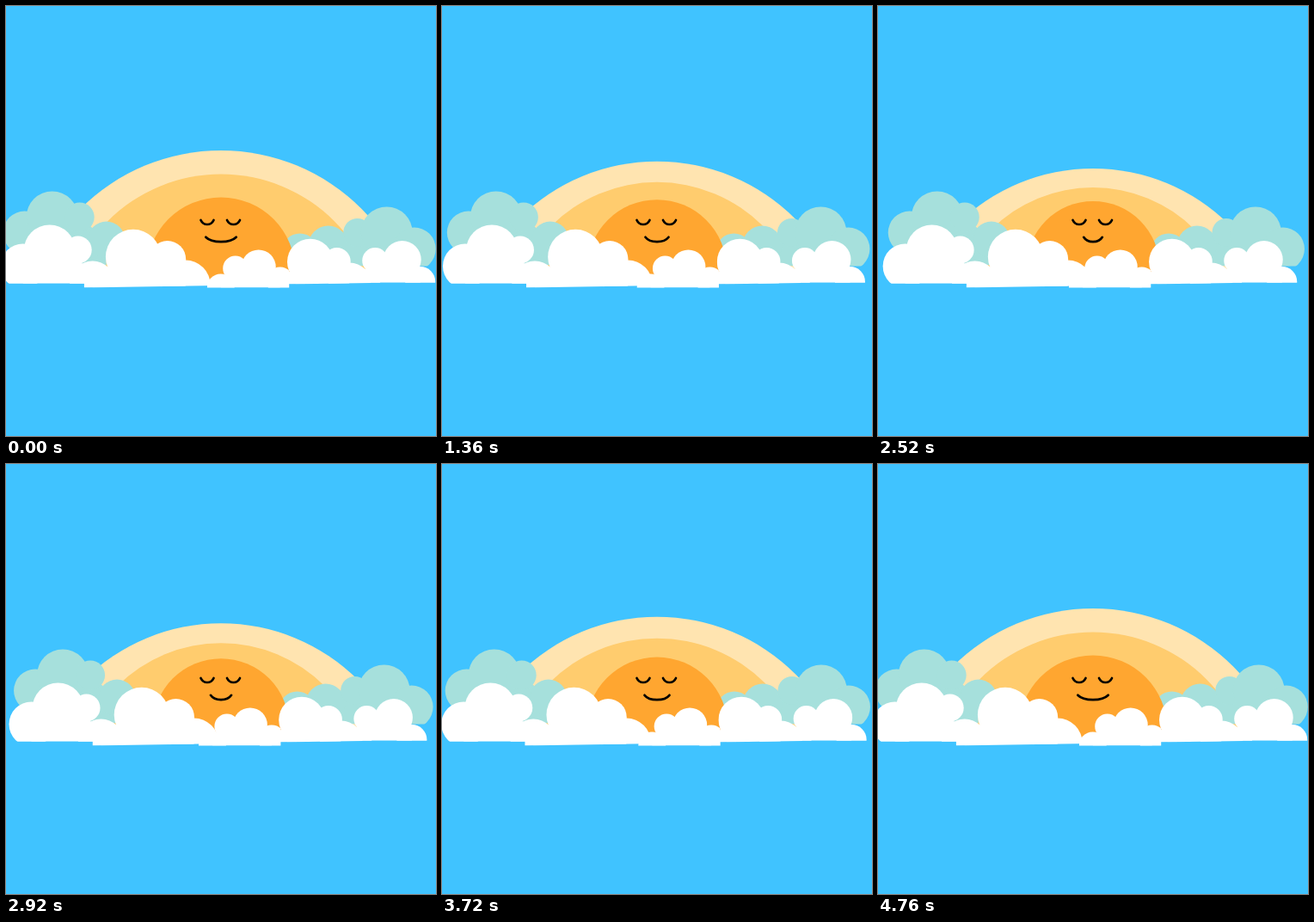
Animation of 500x500 px, one loop 4.84 s. Source, as an HTML page:

```html
<!DOCTYPE html>
<html lang="en">
<head>
<meta charset="utf-8">
<title>Sun behind clouds</title>
<style>
  html, body { margin: 0; width: 100%; height: 100%; overflow: hidden; background: #40c3ff; }
  svg { display: block; width: 100%; height: 100%; }
</style>
</head>
<body>
<svg viewBox="0 0 500 500">
  <defs>
    <clipPath id="rayClip"><rect width="500" height="310"/></clipPath>
    <clipPath id="sunClip"><rect width="500" height="320"/></clipPath>
  </defs>
  <rect width="500" height="500" fill="#40c3ff"/>
  <g clip-path="url(#rayClip)">
    <circle id="outer" fill="#ffe4b0"/>
    <circle id="middle" fill="#ffcc6e"/>
  </g>
  <g id="back" fill="#a6e0dc"/>
  <g clip-path="url(#sunClip)"><circle id="sun" fill="#ffa630"/></g>
  <g fill="none" stroke="#000" stroke-width="2.7" stroke-linecap="round">
    <path id="eyes"/>
    <path id="smile"/>
  </g>
  <g id="front" fill="#fff"/>
</svg>
<script>
const NS = "http://www.w3.org/2000/svg";
const LOOP = 4840, STEP = 40, END = 4760;
const $ = id => document.getElementById(id);

function add(parent, tag, attrs) {
  const el = document.createElementNS(NS, tag);
  for (const k in attrs) el.setAttribute(k, attrs[k]);
  return parent.appendChild(el);
}

// A cloud is a chain of puffs [cx, cy, r], filled below its centres
// and cut off at the sides and along a sloping floor.
function cloud(layer, drift, puffs, floor, left = -60, right = 560) {
  const [y0, y1 = y0] = floor;
  const id = "cut" + document.querySelectorAll("clipPath").length;
  const clip = add(document.querySelector("defs"), "clipPath", { id });
  add(clip, "polygon", { points: [left, 0, right, 0, right, y1, left, y0] });
  const el = add($(layer), "g", { "clip-path": `url(#${id})` });
  const centres = puffs.map(p => p.slice(0, 2));
  const base = Math.max(y0, y1);
  add(el, "polygon", { points: [[puffs[0][0], base], ...centres, [puffs.at(-1)[0], base]] });
  for (const [cx, cy, r] of puffs) add(el, "circle", { cx, cy, r });
  return { el, drift };
}

const clouds = [
  cloud("back", 16, [[21, 263, 25], [53, 245, 30], [85, 245, 17], [116, 271.5, 21.5]], [301]),
  cloud("back", -4, [[341, 285, 21], [374, 278, 23], [408, 263, 16.5], [442, 263, 30], [474, 282, 25]], [302]),
  cloud("front", 12.7, [[19, 302, 26], [50, 284, 30], [83, 283, 16], [93, 318, 20]], [322.3]),
  cloud("front", 12.7, [[100, 322, 26], [147.2, 291.2, 32], [187, 294, 21.5], [208, 324, 29]], [327, 324.2], 90, 260),
  cloud("front", -12.7, [[249, 327, 16], [266, 304.5, 14.5], [293, 303, 20], [318, 319, 16]], [327], 233, 328.5),
  cloud("front", -12.7, [[336, 318, 12], [353, 297, 26.7], [384, 296.5, 16], [399, 323, 25]], [323, 321.3], 326, 440),
  cloud("front", -12.7, [[424, 315, 12], [428.5, 295.5, 15], [460, 294.5, 22], [481, 320, 17.5]], [321.3])
];

// Places a disc by its top edge and radius.
function disc(id, top, r) {
  const el = $(id);
  el.setAttribute("cx", 250);
  el.setAttribute("cy", top + r);
  el.setAttribute("r", r);
}

// A hanging curve of half-width w and depth d.
const curve = (x, y, w, d) =>
  `M${x - w} ${y}C${x - w * .6} ${y + d * 4 / 3} ${x + w * .6} ${y + d * 4 / 3} ${x + w} ${y}`;

$("eyes").setAttribute("d", curve(234, 249, 7.5, 5) + curve(264.5, 249, 7.5, 5));

function draw(ms) {
  const t = Math.min(Math.floor((ms % LOOP) / STEP) * STEP, END);
  const u = 1 - Math.abs(2 * t / END - 1);
  disc("outer", 168 + 22.3 * u, 231 - 7 * u);
  disc("middle", 195.5 + 16.4 * u, 186 - 20 * u);
  disc("sun", 222.5 + 4.7 * u, 86.5 - 9.5 * u);
  $("smile").setAttribute("d", curve(250, 268.8, 17.7 - 7.3 * u, 5.4));
  for (const c of clouds) c.el.setAttribute("transform", `translate(${c.drift * u + .7} .5)`);
}

const start = performance.now();
function tick() {
  draw(performance.now() - start);
  requestAnimationFrame(tick);
}
tick();
</script>
</body>
</html>
```
